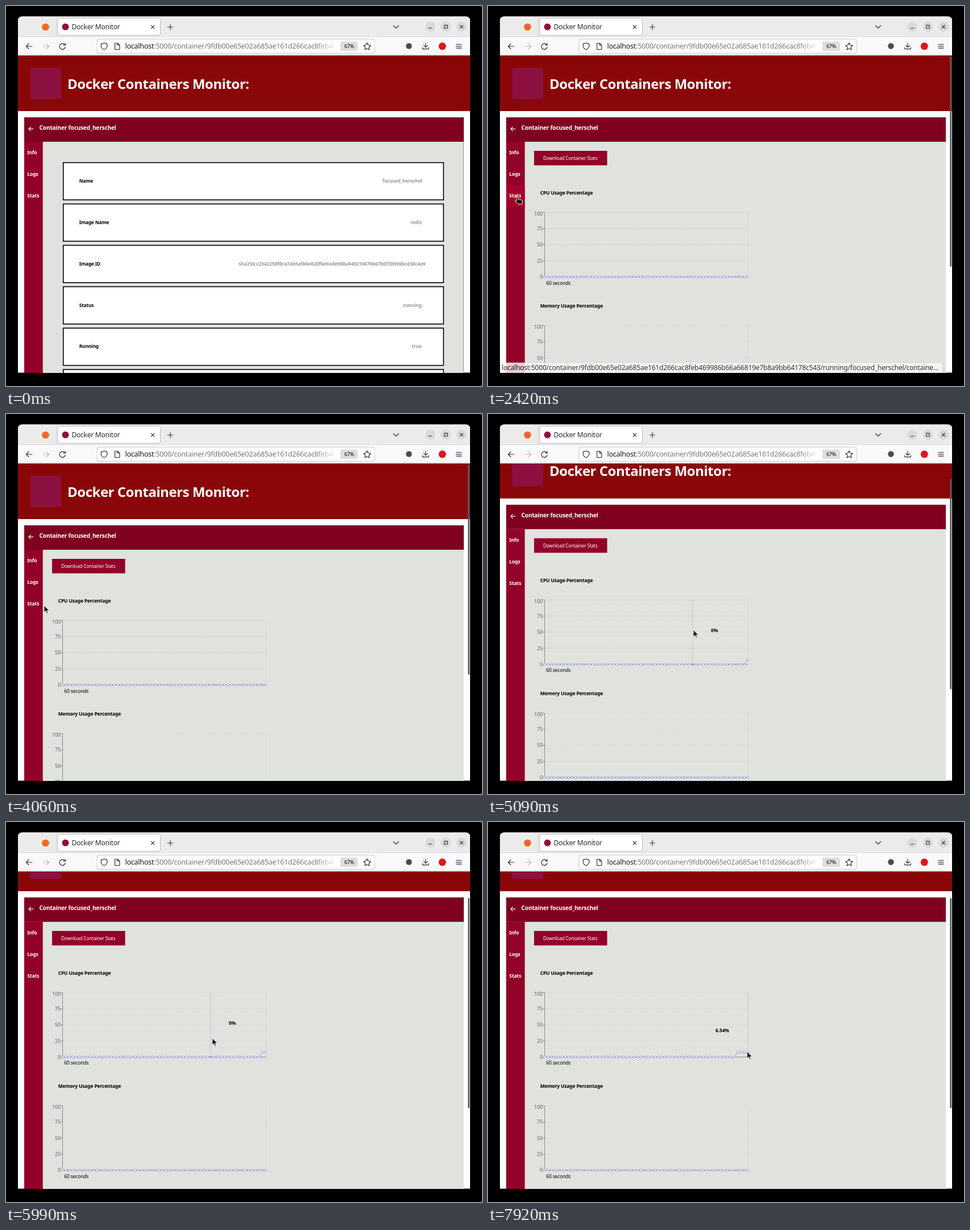
Recreate the animation shown at these times as an HTML page. Size 837 px wide and 669 px high, loop 8 s.

```html
<!DOCTYPE html>
<html lang="en">
<head>
<meta charset="utf-8">
<title>Docker Monitor</title>
<style>
  html, body { margin: 0; width: 100%; height: 100%; overflow: hidden; background: #000; }
  svg { display: block; width: 837px; height: 669px; }
  text { font-family: "Noto Sans", "Open Sans", sans-serif; letter-spacing: -.02em; white-space: pre; }
  .b { font-weight: 700; }
  .end { text-anchor: end; }
  .w { fill: #fff; }
  .side { font-size: 8.7px; }
  .label { font-size: 8.4px; }
  .value { font-size: 8.5px; fill: #999; }
  .head { font-size: 8.5px; }
  .tick { font-size: 9px; fill: #666; }
  .icon { fill: none; stroke: #2b2a33; stroke-width: 1.15; stroke-linecap: round; stroke-linejoin: round; }
  .axis { fill: none; stroke: #666; stroke-width: .7; }
  .grid { fill: none; stroke: #ccc; stroke-width: .7; stroke-dasharray: 2 2; }
  .line { fill: none; stroke: #8884d8; stroke-width: .7; }
  .dot { fill: #fff; stroke: #8884d8; stroke-width: .7; }

  #scroll, #info, #stats, #hover, #status, #thumb { animation: 8s linear infinite; }
  #scroll { animation-name: scroll; }
  #info { animation-name: leave; }
  #stats { animation-name: enter; }
  #hover { animation-name: hover; }
  #status { animation-name: status; }
  #thumb { animation-name: thumb, fade; }

  @keyframes scroll {
    0%, 61.375% { transform: none; animation-timing-function: cubic-bezier(.5, 1, .89, 1); }
    67.875%, 100% { transform: translateY(-63.2px); }
  }
  @keyframes thumb {
    0%, 30.2% { transform: none; height: 374px; }
    30.21%, 61.375% { transform: none; height: 370px; animation-timing-function: cubic-bezier(.5, 1, .89, 1); }
    67.875%, 100% { transform: translateY(45px); height: 370px; }
  }
  @keyframes fade {
    0%, 9% { opacity: 0; }
    9.01%, 43.1% { opacity: 1; }
    48.1%, 50.4% { opacity: 0; }
    50.41%, 100% { opacity: 1; }
  }
  @keyframes leave {
    0%, 30.2% { visibility: visible; }
    30.21%, 100% { visibility: hidden; }
  }
  @keyframes enter {
    0%, 30.2% { visibility: hidden; }
    30.21%, 100% { visibility: visible; }
  }
  @keyframes hover {
    0%, 17% { opacity: 0; }
    17.01%, 50.4% { opacity: 1; }
    50.41%, 100% { opacity: 0; }
  }
  @keyframes status {
    0%, 26.5% { opacity: 0; }
    28.1%, 30% { opacity: 1; }
    31.6%, 100% { opacity: 0; }
  }
</style>
</head>
<body>
<svg viewBox="0 0 837 669">
  <defs>
    <clipPath id="view"><rect x="21" y="87" width="795" height="558.5"/></clipPath>
    <linearGradient id="urlFade" gradientUnits="userSpaceOnUse" x1="545" x2="581" y1="0" y2="0">
      <stop offset="0" stop-color="#fff" stop-opacity="0"/><stop offset="1" stop-color="#fff"/>
    </linearGradient>
    <clipPath id="url"><rect x="205" y="59" width="376" height="24"/></clipPath>
  </defs>

  <!-- window -->
  <path d="M21 645.5V26Q21 18.5 28.5 18.5H808.5Q816 18.5 816 26V645.5Z" fill="#fff"/>
  <path d="M21 54V26Q21 18.5 28.5 18.5H808.5Q816 18.5 816 26V54Z" fill="#ebebeb"/>
  <rect x="21" y="54" width="795" height="33.5" fill="#f9f9fb"/>
  <path d="M21 54H816M88.5 20V53" stroke="#d2d2d4" stroke-width=".8"/>
  <rect x="91" y="21.5" width="180.5" height="30" rx="3" fill="#fff" stroke="#b4b4b8" stroke-width=".9"/>
  <circle cx="69.5" cy="37" r="6.3" fill="#f5652a"/>
  <circle cx="104.5" cy="36.8" r="6" fill="#8c1040"/>
  <text x="115.5" y="41" font-size="12" fill="#2b2a33">Docker Monitor</text>
  <g fill="#dadada"><circle cx="746" cy="36.5" r="9"/><circle cx="773.5" cy="36.5" r="9"/><circle cx="801" cy="36.5" r="9"/></g>
  <g class="icon">
    <path d="M255.3 34.3l5.4 5.4m0-5.4l-5.4 5.4M284.5 37h9m-4.500-4.500v9M681.500 34.500l4.500 4.500 4.500-4.500"/>
    <path d="M743.200 39h5.600M770.800 33.800h5.400v5.400h-5.400zM798.300 33.800l5.400 5.400m0-5.400l-5.400 5.400"/>
    <path d="M46 71H35.500m4.500-4.500L35.500 71l4.500 4.500"/>
    <path d="M65 71h10.500m-4.500-4.500l4.500 4.500-4.500 4.500" stroke="#b5b5ba"/>
    <path d="M103.200 68.200a5.100 5.100 0 1 0 .9 4.200M104.200 65.500v3.500h-3.600"/>
  </g>
  <rect x="160" y="58.300" width="488" height="24.800" rx="3" fill="#fff" stroke="#c4c4c8" stroke-width=".9"/>
  <rect x="588" y="62.500" width="31" height="16.500" rx="2.500" fill="#dedee1"/>
  <text x="603.500" y="74.200" font-size="9" text-anchor="middle" font-weight="500">67%</text>
  <g clip-path="url(#url)">
    <text x="209.500" y="75.200" font-size="12.500" fill="#777780"><tspan fill="#15141a">localhost</tspan>:5000/container/9fdb00e65e02a685ae161d266cac8feb469986</text>
    <rect x="545" y="60" width="37" height="21" fill="url(#urlFade)"/>
  </g>
  <g class="icon">
    <path d="M172.500 65l5.300 1.900v3.600q-.6 4.300-5.300 6.300-4.700-2-5.300-6.300v-3.600z"/>
    <path d="M191.500 65.500h5l3.300 3.300v7.700h-8.300zM196.300 65.500v3.500h3.500"/>
    <path d="M635 64.800l1.900 4 4.400.6-3.200 3.100.8 4.400-3.900-2.100-3.900 2.100.8-4.400-3.200-3.100 4.400-.6z"/>
    <path d="M738 65v7.500m-3.300-3l3.300 3.200 3.300-3.200M732.800 73v2.600h10.400V73"/>
    <path d="M791.800 67.500h9.200m-9.200 3.300h9.200m-9.200 3.300h9.200"/>
  </g>
  <circle cx="708.500" cy="70.500" r="5.200" fill="#4a4a52"/>
  <circle cx="767.300" cy="70.800" r="6.500" fill="#e0151b"/>

  <!-- page -->
  <g clip-path="url(#view)">
    <g id="scroll">
      <rect x="21" y="87" width="795" height="98" fill="#8a0709"/>
      <rect x="42.500" y="109" width="54.500" height="54.500" fill="#8c1040"/>
      <text class="b w" x="108" y="145.500" font-size="24">Docker Containers Monitor:</text>
      <rect x="32" y="239" width="773" height="700" fill="#e0e2de"/>
      <rect x="32" y="196" width="773" height="43" fill="#80001f"/>
      <path class="icon" d="M48 216.300h-8m3.500-3.500l-3.500 3.500 3.500 3.500" style="stroke:#fff"/>
      <text class="b w" x="58.500" y="218" font-size="10.200">Container focused_herschel</text>
      <rect x="32" y="239" width="32.700" height="700" fill="#930028"/>
      <rect id="hover" x="32" y="316" width="32.700" height="38" fill="#a8002d"/>
      <g class="b w side">
        <text x="37.300" y="261">Info</text><text x="37.300" y="299.200">Logs</text><text x="37.300" y="337.300">Stats</text>
      </g>
      <g id="info"><path d="M804.500 239V900" stroke="#777" stroke-width=".7"/></g>
      <g id="stats">
        <rect x="81" y="255" width="128.500" height="25.500" fill="#930028"/>
        <text class="w" x="97" y="271" font-size="8.150">Download Container Stats</text>
      </g>
    </g>
    <rect id="thumb" x="812.300" y="89" width="2.800" height="374" rx="1.400" fill="#5c5c5e"/>
    <g id="status">
      <path d="M21 646V628H796q3 0 3 3v15z" fill="#f9f9fb" stroke="#ccc" stroke-width=".7"/>
      <text x="24" y="641.300" font-size="12.100" fill="#15141a">localhost:5000/container/9fdb00e65e02a685ae161d266cac8feb469986b66a66819e7b8a9bb64178c543/running/focused_herschel/containe…</text>
    </g>
  </g>

  <g id="cursor" fill="#1c1c1c" stroke="#fff" stroke-width=".9" stroke-linejoin="round">
    <path id="arrow" d="M0 0V12.500L3 9.800 5 14.400 7 13.500 5.100 9.200 9 9Z"/>
    <path id="hand" d="M-1.300 1.200Q0-1 1.300 1.200V5.500L7.500 7Q9 7.500 9 9.500L8 14.200H1L-4 8.700Q-3.500 6.700-1.300 8.200Z"/>
  </g>
</svg>

<script>
const $ = id => document.getElementById(id);
const add = (id, markup) => $(id).insertAdjacentHTML('beforeend', markup);

const LOOP = 8000, POINTS = 60;
const LEFT = 99.5, RIGHT = 457, TOP = 363.5, BASE = 477;
const pointX = i => LEFT + (RIGHT - LEFT) * i / (POINTS - 1);
const valueY = v => BASE - (BASE - TOP) * v / 100;
const range = n => [...Array(n).keys()];

// Info cards: label, value, right edge of the value
[
  ['Name', 'focused_herschel', 732],
  ['Image Name', 'redis', 731],
  ['Image ID', 'sha256:c2342258f8ca7ab5af86e82df6e9ade908a949216679667b0f39b59bcd38c4e9', 737.5],
  ['Status', 'running', 731],
  ['Running', 'true', 731],
  ['', '', 731]
].forEach(([label, value, right], i) => {
  const y = 275 + i * 72.85;
  add('info', `<rect x="100.7" y="${y + .7}" width="668.6" height="65.600" fill="#fff" stroke="#000" stroke-width="1.600"/>
    <text class="b label" x="128.700" y="${y + 36}">${label}</text>
    <text class="b value end" x="${right}" y="${y + 36}">${value}</text>`);
});

function chart(id, title, dy) {
  const ticks = [0, 25, 50, 75, 100].map(v => {
    const y = valueY(v);
    return `<path class="grid" d="M${LEFT} ${y}H${RIGHT}"/><path class="axis" d="M${LEFT - 3.500} ${y}h3.500"/>
      <text class="tick end" x="96" y="${y + (v === 100 ? 5.700 : 3.200)}">${v}</text>`;
  }).join('');
  const dots = range(POINTS).map(i => `<circle class="dot" cx="${pointX(i)}" cy="${BASE}" r="1.800"/>`).join('');
  add('stats', `<g id="${id}" transform="translate(0 ${dy})">
    <text class="b head" x="91.700" y="332">${title}</text>${ticks}
    <path class="grid" d="M${RIGHT} ${TOP}V${BASE}"/>
    <path class="axis" d="M${LEFT} ${TOP}V${BASE}H${RIGHT}"/>
    <path class="line" d="M${LEFT} ${BASE}H${RIGHT}"/>${dots}
    <text class="head" x="102.300" y="490.500">60 seconds</text></g>`);
}
chart('cpu', 'CPU Usage Percentage', 0);
chart('memory', 'Memory Usage Percentage', 199.3);
add('cpu', `<g id="tip"><path id="guide" d="M0 ${TOP}V${BASE}" stroke="#c4c4c4" stroke-width=".8"/>
  <circle id="active" r="1.700" fill="#6a64cc" stroke="#fff" stroke-width=".5"/>
  <text id="reading" class="b head"></text></g>`);

const cpuLine = document.querySelector('#cpu .line');
const cpuDots = document.querySelectorAll('#cpu .dot');

// Keys are [time, x, y]
const pointer = [
  [500, 7, 396], [1300, 45, 356], [1620, 51, 345], [2020, 51.700, 334.500], [3990, 51.700, 334.500],
  [4060, 67, 337], [4860, 361, 380], [5920, 361, 380], [6790, 454.500, 404], [7300, 456, 404],
  [7760, 456, 404], [7920, 455.500, 404]
];
const tooltip = [
  [4180, 131, 378], [4920, 392, 420.500], [5950, 392, 420.500], [6300, 387, 423],
  [6790, 396, 430], [7300, 400, 432.800]
];
const samples = [[5010, 7.5], [5950, 7.4], [6740, 6.94], [7640, 6.54]];

function along(keys, t) {
  const n = keys.findIndex(k => k[0] > t);
  if (n < 1) return (n ? keys[keys.length - 1] : keys[0]).slice(1);
  const [a, b] = [keys[n - 1], keys[n]];
  const p = (t - a[0]) / (b[0] - a[0]), e = p * p * (3 - 2 * p);
  return [a[1] + (b[1] - a[1]) * e, a[2] + (b[2] - a[2]) * e];
}

const show = (id, on) => $(id).setAttribute('display', on ? 'inline' : 'none');
const set = (el, attrs) => Object.entries(attrs).forEach(([k, v]) => el.setAttribute(k, v));

function render(t) {
  const [x, y] = along(pointer, t);
  const hand = t >= 1780 && t < 4030;
  show('cursor', t >= 500);
  show('hand', hand);
  show('arrow', !hand);
  $('cursor').setAttribute('transform', `translate(${x} ${y})`);

  // New samples push the series to the left
  const seen = samples.filter(s => s[0] <= t).map(s => s[1]);
  const data = [...Array(POINTS - seen.length).fill(0), ...seen];
  cpuLine.setAttribute('d', 'M' + data.map((v, i) => `${pointX(i)} ${valueY(v)}`).join('L'));
  data.forEach((v, i) => cpuDots[i].setAttribute('cy', valueY(v)));

  show('tip', t > 4060 && x >= LEFT);
  const i = Math.max(0, Math.min(POINTS - 1, Math.round((x - LEFT) / (RIGHT - LEFT) * (POINTS - 1))));
  const [tx, ty] = along(tooltip, t);
  $('guide').setAttribute('transform', `translate(${pointX(i)} 0)`);
  set($('active'), { cx: pointX(i), cy: valueY(data[i]) });
  set($('reading'), { x: tx, y: ty });
  $('reading').textContent = data[i] + '%';
}

let start;
function frame(now) {
  start ??= now;
  render((now - start) % LOOP);
  requestAnimationFrame(frame);
}
render(0);
requestAnimationFrame(frame);
</script>
</body>
</html>
```
